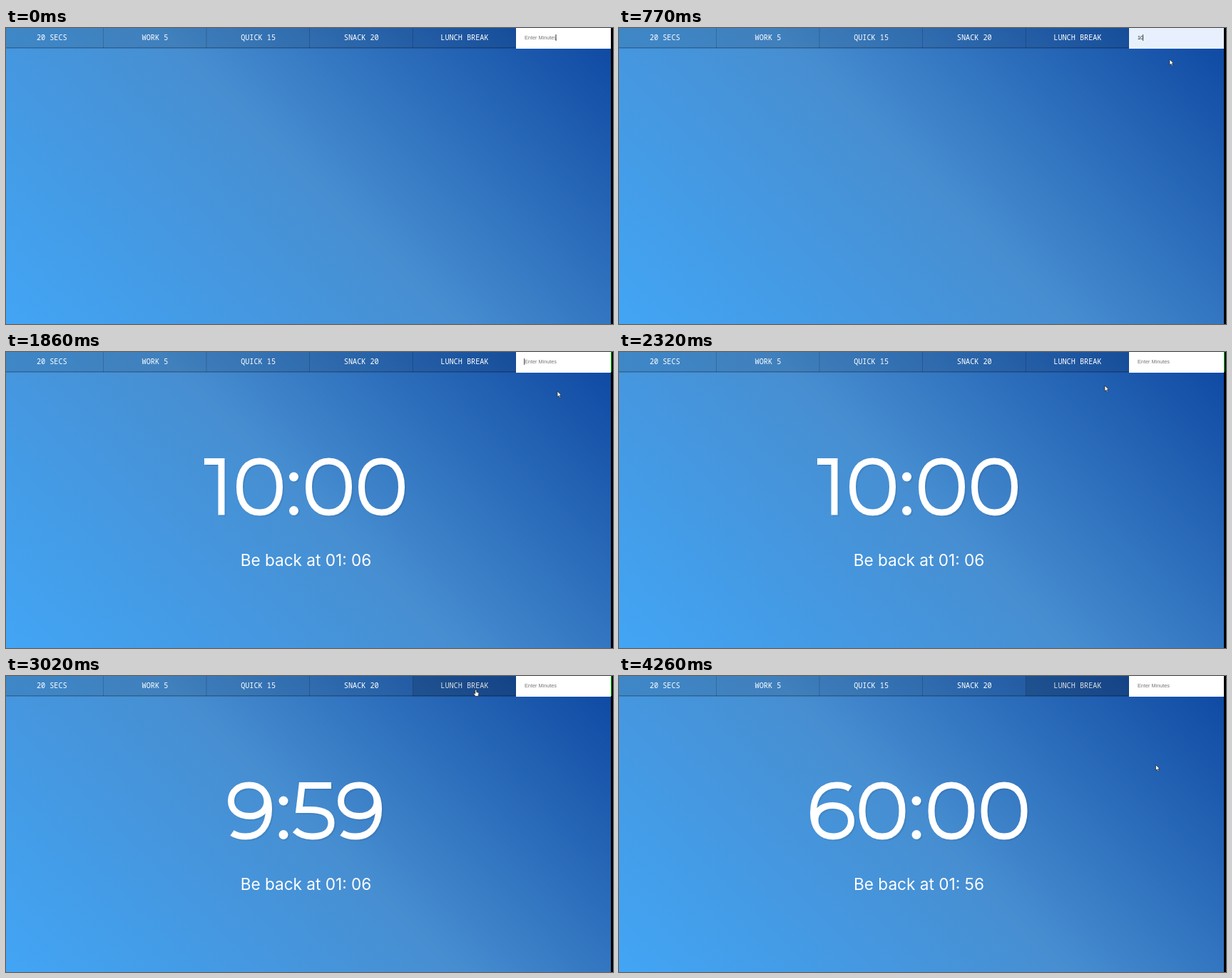
Write an HTML page that moves like this. It is 851 px wide and 415 px high and loops after 4340 ms.

```html
<!DOCTYPE html>
<html lang="en">
<head>
<meta charset="utf-8">
<title>Countdown timer</title>
<style>
  html, body { margin: 0; width: 100%; height: 100%; overflow: hidden; background: #000; }
  #page { position: relative; width: 851px; height: 415px; }
  #page::before {
    content: ""; position: absolute; inset: 0 3px 0 0;
    background: linear-gradient(45deg, #42a5f5 0%, #478ed1 50%, #0d47a1 100%);
  }
  svg { position: absolute; inset: 0; }
  .label { font: 10.2px "Noto Sans Mono", monospace; fill: #fff; text-anchor: middle; }
  .field { font: 7.3px "Liberation Sans", Arial, sans-serif; }
  .item { font: 500 6.5px Roboto, sans-serif; fill: #222; }
  #clock { fill: none; stroke: #fff; stroke-width: 9; filter: drop-shadow(2px 2px 0 rgba(0,0,0,.07)); }
  #clock circle { fill: #fff; stroke: none; }
  #back { font: 22.6px Inter, sans-serif; fill: #fff; text-anchor: middle; }
  #list { filter: drop-shadow(0 1px 1.5px rgba(0,0,0,.4)); }
  #cursor { fill: #fff; stroke: #222; stroke-width: .7; }
</style>
</head>
<body>
<div id="page">
<svg width="851" height="415" viewBox="0 0 851 415">
  <g id="buttons"></g>
  <rect id="hover" x="570.5" width="144.5" height="28.5" fill-opacity=".13"/>
  <rect id="input" x="715" width="133" height="29"/>
  <text id="value" class="field" x="727" y="16"></text>
  <rect id="caret" y="9" width=".8" height="9" fill="#222"/>
  <rect id="edge" x="848" width="1" height="28" fill="#0c1"/>
  <g id="list">
    <rect x="715" y="30" width="133" height="48" rx="1.5" fill="#fff"/>
    <rect id="row" x="715" y="34" width="133" height="19.5" fill="#e8e8ea"/>
    <text class="item" x="721.5" y="46">10</text>
    <text class="item" x="721.5" y="66">5</text>
  </g>
  <g id="clock" role="img"></g>
  <text id="back" x="420.5" y="300"></text>
  <circle id="click" cx="657.5" cy="19" r="6.7" fill="#b9b72f" fill-opacity=".85"/>
  <path id="cursor"/>
</svg>
</div>
<script>
const LOOP = 4340, STEP = 76.6;
const $ = id => document.getElementById(id);
const show = (id, on) => $(id).style.display = on ? '' : 'none';
const within = (t, ...spans) => spans.some(([a, b]) => t >= a && t < b);

$('buttons').innerHTML = ['20 SECS', 'WORK 5', 'QUICK 15', 'SNACK 20', 'LUNCH BREAK'].map((name, i) => {
  const x = i * 144.65 - 8;
  return `<rect x="${x}" width="144.65" height="28.5" fill-opacity=".1"/>
    <rect x="${x}" y="27" width="144.65" height="1.5" fill-opacity=".25"/>
    <rect x="${x + 144}" width=".7" height="28" fill-opacity=".25"/>
    <text class="label" x="${x + 72.3}" y="17">${name}</text>`;
}).join('');

// Numerals as [advance, pen strokes] on an 80px height
const nine = `<path d="M33 47.5C17 47.5 6.5 39 6.5 26S17 4 32 4C50 4 59.5 17 59.5 37C59.5 62 47 76 27 76C19 76 13 74.5 8 71
  M33 47.5C47 47.5 57 39 57 27S48 4 32 4"/>`;
const glyphs = {
  0: [74, '<path d="M9 40C9 17 20 4 37 4S65 17 65 40 54 76 37 76 9 63 9 40Z"/>'],
  1: [41, '<path d="M.5 4.5H24.5V79.5"/>'],
  5: [62, '<path d="M55 4.5H14L10 38.5H25C46 38.5 55 45 55 57S45.5 76 28 76C18 76 10 72.5 4 67"/>'],
  6: [68, `<g transform="rotate(180 34 40)">${nine}</g>`],
  8: [72, `<path d="M36 39C21 39 12 32 12 21.5S21 4 36 4 60 11 60 21.5 51 39 36 39C19 39 9 46 9 57.5
    S19 76 36 76 63 69 63 57.5 53 39 36 39Z"/>`],
  9: [69, nine],
  ':': [23, '<circle cx="11" cy="26" r="6.5"/><circle cx="11" cy="73.5" r="6.5"/>']
};

let shown;
function setClock(time) {
  if (time === shown) return;
  shown = time;
  const chars = [...time];
  let x = 420.5 - chars.reduce((sum, c) => sum + glyphs[c][0], 0) / 2;
  $('clock').setAttribute('aria-label', time);
  $('clock').innerHTML = chars.map(c => {
    const mark = `<g transform="translate(${x} 149)">${glyphs[c][1]}</g>`;
    x += glyphs[c][0];
    return mark;
  }).join('');
}

const pointers = {
  beam: 'M-1.2 0H1.2M0 0V7M-1.2 7H1.2',
  arrow: 'M0 0V8L1.9 6.3 3.1 9 4.5 8.4 3.2 5.8H5.6Z',
  hand: 'M-1.2 .3Q0-.7 .8 .3V3.2L3.4 3.8Q4 4 3.8 5L3.2 8.8H-1L-3.2 5.6Q-3-.2+4-1.2 5.2Z'.replace('Q-3-.2+4-1.2 5.2', 'Q-2.6 4-1.2 5.2')
};
pointers.hand = 'M-1.2 .3Q0-.7.8 .3V3.2L3.4 3.8Q4 4 3.8 5L3.2 8.8H-1L-3.2 5.6Q-2.6 4-1.2 5.2Z';

// Pointer path: time, x, y
const path = [
  [0, 771, 10], [80, 771, 10], [310, 771.5, 35], [540, 772, 40], [620, 772, 41],
  [1080, 772, 59], [1859, 772, 59], [1860, 773, 55], [2010, 766, 67], [2320, 681, 47],
  [2470, 669.5, 34], [2700, 659, 19.5], [4179, 659, 19.5], [4180, 705, 70],
  [4260, 752.5, 124.5], [LOOP, 752.5, 124.5]
];
function pointerAt(t) {
  const i = path.findIndex(key => key[0] > t);
  const [t0, x0, y0] = path[i - 1], [t1, x1, y1] = path[i];
  const k = Math.floor((t - t0) / STEP) * STEP / (t1 - t0);
  return [x0 + (x1 - x0) * k, y0 + (y1 - y0) * k];
}

function draw(t) {
  const filled = within(t, [230, 1460]);
  $('input').setAttribute('fill', filled ? '#e8f0fe' : '#fff');
  $('value').setAttribute('fill', filled ? '#222' : '#757575');
  $('value').textContent = filled ? '10' : 'Enter Minutes';
  $('caret').setAttribute('x', within(t, [770, 1460]) ? 734.3 : 726.3);
  show('caret', within(t, [80, 620], [770, 1310], [1460, 1940], [2470, 3020], [3590, 3800]));
  show('list', within(t, [80, 770]));
  show('row', filled);
  show('edge', within(t, [1460, 3800]));
  show('hover', t >= 2620);
  show('click', within(t, [3800, 3950]));

  const running = t >= 1460;
  show('clock', running);
  show('back', running);
  setClock(t < 2400 ? '10:00' : t < 3420 ? '9:59' : t < 3950 ? '9:58' : '60:00');
  $('back').textContent = 'Be back at 01: ' + (t < 3950 ? '06' : '56');

  const kind = t < 230 ? 'beam' : within(t, [2870, 4180]) ? 'hand' : 'arrow';
  $('cursor').setAttribute('d', pointers[kind]);
  $('cursor').setAttribute('transform', `translate(${pointerAt(t)})`);
}

const start = performance.now();
function frame() {
  draw((performance.now() - start) % LOOP);
  requestAnimationFrame(frame);
}
frame();
</script>
</body>
</html>
```
